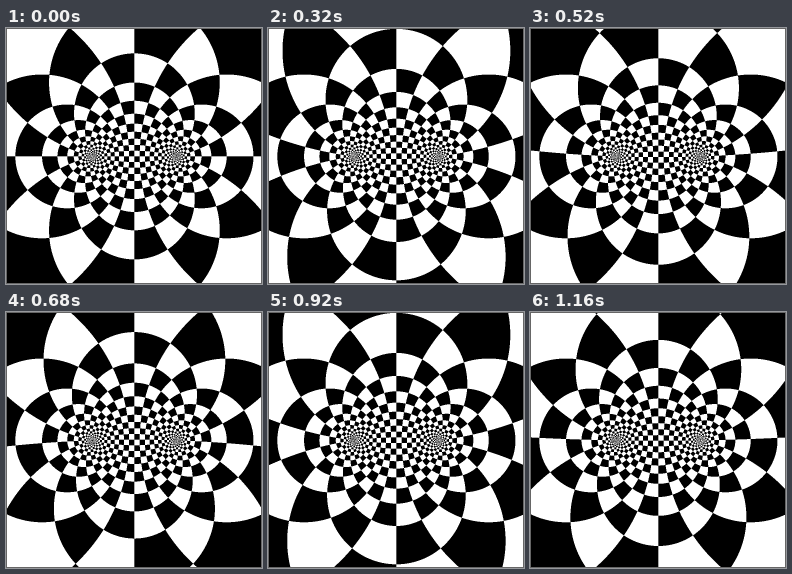
An HTML page with a canvas for the animation above (1.2 s loop, 256x256 px).

```html
<!DOCTYPE html>
<html lang="en">
<head>
<meta charset="utf-8">
<title>Bipolar checkerboard</title>
<style>
  html, body { margin: 0; width: 100%; height: 100%; overflow: hidden; background: #fff; }
  canvas { display: block; width: 100vw; height: 100vh; image-rendering: pixelated; }
</style>
</head>
<body>
<canvas id="stage" width="256" height="256"></canvas>
<script>
const SIZE = 256, MID = 128.4;
const FOCUS = SIZE / 6;           // distance of each pole from the centre
const TAU_STEP = 0.25;            // cell size across the circles around the poles
const CELLS = 24;                 // cells around the sigma angle
const LOOP = 1200, STEP = 40;
const SUB = 3, SAMPLES = SUB * SUB;
const EDGE = 102;

const ctx = document.getElementById('stage').getContext('2d');
const image = ctx.createImageData(SIZE, SIZE);
const pixels = new Uint32Array(image.data.buffer);
const sigma = new Float32Array(SIZE * SIZE * SAMPLES);
const ring = new Int16Array(sigma.length);

const gray = v => (0xff000000 | v << 16 | v << 8 | v) >>> 0;
const shades = Array.from({ length: SAMPLES + 1 }, (_, n) => gray(Math.round(255 * n / SAMPLES)));

// Bipolar coordinates of every sample, in units of cells.
for (let i = 0; i < sigma.length; i++) {
  const p = Math.floor(i / SAMPLES), s = i % SAMPLES;
  const x = MID - p % SIZE - (s % SUB + 0.5) / SUB;
  const y = MID - Math.floor(p / SIZE) - (Math.floor(s / SUB) + 0.5) / SUB;
  const near = Math.hypot(x - FOCUS, y), far = Math.hypot(x + FOCUS, y);
  const angle = Math.atan2(2 * FOCUS * y, x * x + y * y - FOCUS * FOCUS);
  sigma[i] = angle * CELLS / (2 * Math.PI);
  ring[i] = Math.floor(Math.log(far / near) / TAU_STEP);
}

function draw(step) {
  const shift = 2 * step * STEP / LOOP;
  for (let p = 0, i = 0; p < pixels.length; p++) {
    let black = 0;
    for (let s = 0; s < SAMPLES; s++, i++) {
      black += (Math.floor(sigma[i] + shift) + ring[i]) & 1;
    }
    pixels[p] = shades[SAMPLES - black];
  }
  const last = SIZE - 1;
  for (let i = 0; i < SIZE; i++) {
    for (const p of [i, last * SIZE + i, i * SIZE, i * SIZE + last]) pixels[p] = gray(EDGE);
  }
  ctx.putImageData(image, 0, 0);
}

const start = performance.now();
let shown = -1;
function tick() {
  const step = Math.floor((performance.now() - start) % LOOP / STEP);
  if (step !== shown) draw(shown = step);
  requestAnimationFrame(tick);
}
tick();
</script>
</body>
</html>
```
